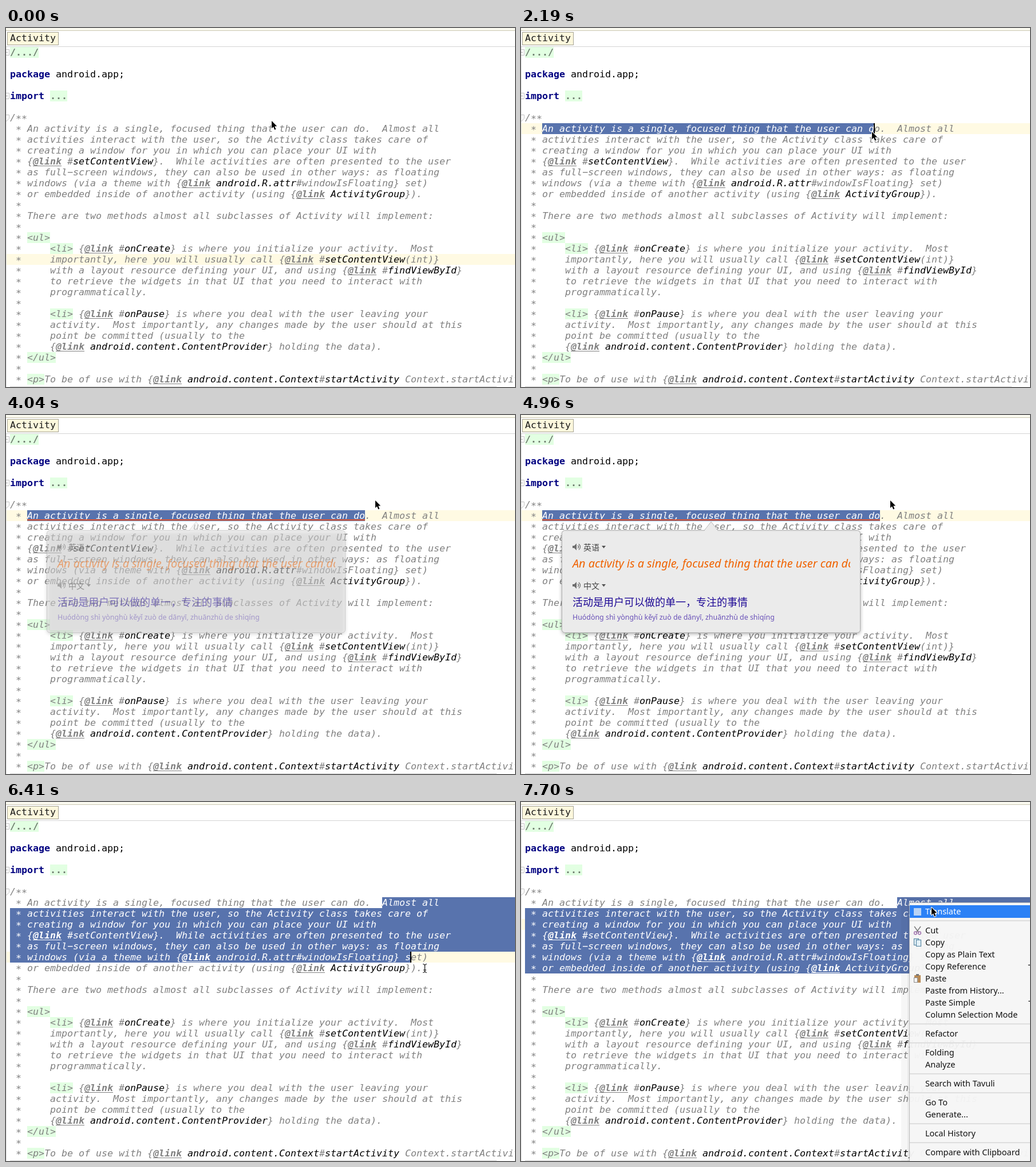
An HTML page with a canvas for the animation above (8 s loop, 889 by 626 pixels).

```html
<!DOCTYPE html>
<html lang="en">
<head>
<meta charset="utf-8">
<title>Translate selection</title>
<style>
html, body { margin: 0; width: 889px; height: 626px; overflow: hidden; background: #fff; }
canvas { display: block; }
</style>
</head>
<body>
<canvas id="stage" width="889" height="626"></canvas>
<script>
const ctx = document.getElementById('stage').getContext('2d');
const W = 889, H = 626, LOOP = 8000;
const LEFT = 7, TOP = 33, COL = 10, ROW = 19;
const MONO = '16.61px "DejaVu Sans Mono", monospace';
const UI = '"Noto Sans", "Open Sans", sans-serif';
const CJK = '"Noto Sans CJK SC", "Noto Sans CJK", sans-serif';
const CREAM = '#fffae3', GREEN = '#e2ffe2', BLUE = '#5873ad';

// Backticks mark link targets.
const DOC = `An activity is a single, focused thing that the user can do.  Almost all
activities interact with the user, so the Activity class takes care of
creating a window for you in which you can place your UI with
{@link #\`setContentView\`}.  While activities are often presented to the user
as full−screen windows, they can also be used in other ways: as floating
windows (via a theme with {@link \`android.R.attr\`#windowIsFloating} set)
or embedded inside of another activity (using {@link \`ActivityGroup\`}).

There are two methods almost all subclasses of Activity will implement:

<ul>
    <li> {@link #\`onCreate\`} is where you initialize your activity.  Most
    importantly, here you will usually call {@link #\`setContentView\`(int)}
    with a layout resource defining your UI, and using {@link #\`findViewById\`}
    to retrieve the widgets in that UI that you need to interact with
    programmatically.

    <li> {@link #\`onPause\`} is where you deal with the user leaving your
    activity.  Most importantly, any changes made by the user should at this
    point be committed (usually to the
    {@link \`android.content.ContentProvider\`} holding the data).
</ul>

<p>To be of use with {@link \`android.content.Context\`#\`startActivity\` Context.startActivity(Intent)`
  .split('\n').map(line => line.split(/(`[^`]*`|@link|<\/?\w+>)/));
const FIRST = 7;

const MENU = [
  ['Translate', '^⌘U', 'translate'], null,
  ['Cut', '⌘X', 'cut'], ['Copy', '⌘C', 'copy'], ['Copy as Plain Text'], ['Copy Reference', '⌥⇧⌘C'],
  ['Paste', '⌘V', 'paste'], ['Paste from History...', '⇧⌘V'], ['Paste Simple', '⌥⇧⌘V'],
  ['Column Selection Mode', '⇧⌘8'], null,
  ['Find Usages', '⇧⌘G'], ['Find Sample Code', '⌥F8'], ['Refactor', '▶'], null,
  ['Folding', '▶'], ['Analyze', '▶'], null,
  ['Search with Tavuli'], null,
  ['Go To', '▶'], ['Generate...', '⌘N'], null,
  ['Local History', '▶'], null,
  ['Compare with Clipboard']
];
const SHORT_MENU = MENU.filter(item => !item || !item[0].startsWith('Find'));

// Current line, selection start/end columns (start is always on the first doc row).
const EDITS = [
  { t: 0, row: 19 },
  { t: 880, row: 7, end: 3, caret: true },
  { t: 1580, row: 7, start: 3, end: 29, caret: true },
  { t: 1780, row: 7, start: 3, end: 42, caret: true },
  { t: 2020, row: 7, start: 3, end: 56, caret: true },
  { t: 2190, row: 7, start: 3, end: 61, caret: true },
  { t: 2600, row: 7, start: 3, end: 62, caret: true },
  { t: 4020, row: 7, start: 3, end: 62 },
  { t: 5160, row: 6, end: 3, caret: true },
  { t: 5790, row: 7, end: 65, caret: true },
  { t: 6030, row: 10, start: 65, end: 66, caret: true },
  { t: 6200, row: 11, start: 65, end: 68, caret: true },
  { t: 6410, row: 12, start: 65, end: 70, caret: true },
  { t: 6590, row: 13, start: 65, end: 72, caret: true },
  { t: 7360, row: 13, start: 65, end: 72, gutter: 9 }
];

const pose = (t, x, y, beam) => ({ t, x, y, beam });
const sweep = Array.from({ length: 8 }, (_, i) => {
  const p = (i + 1) / 8, k = p * p * (3 - 2 * p);
  return pose(230 + 650 * i / 7, 443 - 415 * k, 161 + 7 * k);
});
const POINTER = [
  pose(0, 463, 161), pose(90, 443, 161), ...sweep,
  pose(1050, 31, 169), pose(1170, 35, 170), pose(1400, 233, 176), pose(1580, 457, 177),
  pose(1780, 560, 180), pose(2020, 612, 180), pose(2400, 622, 179),
  pose(2810, 618, 178), pose(2930, 614, 177),
  pose(3380, 628, 164), pose(3500, 640, 152), pose(3620, 644, 148),
  pose(5160, 650, 158, true), pose(5280, 656, 168, true), pose(5430, 656, 173, true),
  pose(5520, 656, 178, true), pose(5880, 660, 226, true), pose(6030, 684, 264, true),
  pose(6200, 710, 274, true), pose(6410, 731, 290, true),
  pose(6800, 712, 284), pose(6902, 677, 274), pose(7210, 688, 255),
  pose(7360, 698, 236), pose(7470, 706, 221), pose(7620, 712, 200), pose(7700, 716, 183)
];

const at = (list, t) => list.reduce((found, item) => item.t <= t ? item : found);
const rowTop = row => TOP + row * ROW;
const colX = col => LEFT + col * COL;

function rect(x, y, w, h, color) {
  ctx.fillStyle = color;
  ctx.fillRect(x, y, w, h);
}

function text(str, x, y, font, color, align = 'left') {
  ctx.font = font;
  ctx.fillStyle = color;
  ctx.textAlign = align;
  ctx.fillText(str, x, y);
}

function poly(points, fill, stroke, width = 1) {
  ctx.beginPath();
  points.forEach(([x, y]) => ctx.lineTo(x, y));
  ctx.closePath();
  if (stroke) { ctx.strokeStyle = stroke; ctx.lineWidth = width; ctx.stroke(); }
  if (fill) { ctx.fillStyle = fill; ctx.fill(); }
}

function line(points, color, width = 1) {
  ctx.beginPath();
  points.forEach(([x, y]) => ctx.lineTo(x, y));
  ctx.strokeStyle = color;
  ctx.lineWidth = width;
  ctx.stroke();
}

function docLine(tokens, row, selected) {
  const base = rowTop(row) + 15;
  const gray = selected ? '#fff' : '#808080';
  text('*', colX(1), base + 2, 'italic ' + MONO, gray);
  let col = 3;
  for (const token of tokens) {
    const target = token[0] === '`', link = token === '@link';
    const str = target ? token.slice(1, -1) : token;
    const x = colX(col), width = str.length * COL;
    if (token[0] === '<' && !selected) rect(x, rowTop(row), width, ROW, GREEN);
    text(str, x, base, (link ? 'bold italic ' : 'italic ') + MONO, target && !selected ? '#000' : gray);
    if (link) rect(x, base + 2, width, 1, gray);
    col += str.length;
  }
}

function header() {
  rect(0, 0, W, 4, '#fbfaf0');
  rect(0, 4, W, 1, '#cbc7b2');
  rect(0, 32, W, 1, '#d4d4d4');
  rect(2, 7, 90, 23, '#a5a394');
  rect(3, 8, 88, 21, '#fdf8dd');
  text('Activity', 7, 23, MONO, '#1a1a1a');
}

function codeTop() {
  for (const [row, x, w] of [[0, 7, 50], [4, 77, 30]]) {
    rect(x, rowTop(row), w, ROW, GREEN);
    line([[0, rowTop(row) + 4.5], [5.5, rowTop(row) + 4.5], [5.5, rowTop(row) + 14.5], [0, rowTop(row) + 14.5]], '#c4c4c4');
    line([[0, rowTop(row) + 9.5], [3, rowTop(row) + 9.5]], '#b0b0b0');
  }
  line([[0, 151.5], [5.5, 151.5], [5.5, 158], [0, 163]], '#c4c4c4');
  text('/.../', LEFT, rowTop(0) + 15, 'bold ' + MONO, '#6c7a6c');
  text('package', LEFT, rowTop(2) + 15, 'bold ' + MONO, '#000080');
  text('android.app;', colX(8), rowTop(2) + 15, MONO, '#000');
  text('import', LEFT, rowTop(4) + 15, 'bold ' + MONO, '#000080');
  text('...', colX(7), rowTop(4) + 15, 'bold ' + MONO, '#6c7a6c');
  text('/', LEFT, rowTop(6) + 15, 'italic ' + MONO, '#808080');
  text('**', colX(1), rowTop(6) + 17, 'italic ' + MONO, '#808080');
}

function selection({ row, start, end }) {
  ctx.save();
  ctx.beginPath();
  for (let r = FIRST; r <= row; r++) {
    const x = r === FIRST ? colX(start) : LEFT;
    const right = r === row ? colX(end) : W;
    ctx.rect(x, rowTop(r), right - x, ROW);
  }
  ctx.clip();
  rect(0, 0, W, H, BLUE);
  for (let r = FIRST; r <= row; r++) docLine(DOC[r - FIRST], r, true);
  ctx.restore();
}

function editor(state) {
  rect(0, 0, W, H, '#fff');
  rect(0, rowTop(state.gutter || state.row), W, ROW, CREAM);
  rect(0, 33, 1, H, '#e2e2e2');
  header();
  codeTop();
  DOC.forEach((tokens, i) => docLine(tokens, FIRST + i, false));
  if (state.start) selection(state);
  if (state.caret) rect(colX(state.end) - 1, rowTop(state.row), 2, ROW, '#000');
  rect(7, 625, 850, 1, '#cfcfcf');
}

function icon(kind, x, y) {
  if (kind === 'translate') rect(x, y - 6, 13, 13, '#b9d3f5');
  if (kind === 'cut') {
    line([[x + 1, y - 7], [x + 9, y + 4]], '#777', 1.4);
    line([[x + 12, y - 7], [x + 4, y + 4]], '#777', 1.4);
    for (const dx of [3, 10]) {
      ctx.beginPath();
      ctx.arc(x + dx, y + 4.5, 2.4, 0, 7);
      ctx.strokeStyle = '#a274b0';
      ctx.lineWidth = 1.5;
      ctx.stroke();
    }
  }
  if (kind === 'copy') {
    for (const [dx, dy] of [[0.5, -6.5], [4.5, -4.5]]) {
      rect(x + dx, y + dy, 8, 11, '#e4f1f8');
      ctx.strokeStyle = '#5d8aa6';
      ctx.lineWidth = 1.2;
      ctx.strokeRect(x + dx, y + dy, 8, 11);
    }
  }
  if (kind === 'paste') {
    rect(x + 1, y - 6, 11, 13, '#b98a55');
    rect(x + 4, y - 8, 5, 3, '#777');
    rect(x, y - 2, 7, 9, '#8c8c8c');
    rect(x + 1, y - 1, 5, 7, '#f3f3f3');
  }
}

function menu(items, x, top, mouse) {
  rect(x - 15, top - 10, W, H, 'rgba(0,0,0,.035)');
  rect(x - 4, top + 2, 4, H, 'rgba(0,0,0,.05)');
  rect(x - 1, top, W, H, 'rgba(185,185,185,.9)');
  rect(x, top + 1, W, H, '#f6f6f6');
  // Faint trace of the page through the panel.
  ctx.save();
  ctx.beginPath();
  ctx.rect(x, top + 1, W, H);
  ctx.clip();
  ctx.globalAlpha = 0.04;
  DOC.forEach((tokens, i) => docLine(tokens, FIRST + i, false));
  ctx.restore();

  let y = top + 16;
  for (const item of items) {
    if (!item) {
      rect(x, y - 6, W, 2, '#dedede');
      y += 12;
      continue;
    }
    const [label, key, kind] = item;
    const hover = mouse.x > x && Math.abs(mouse.y - y) <= 10.5;
    const color = hover ? '#fff' : '#111';
    if (hover) rect(x, y - 11, W, 22, '#2c81f6');
    text(label, x + 27, y + 5, '14.5px ' + UI, color);
    if (key === '▶') poly([[x + 256, y - 5], [x + 265, y], [x + 256, y + 5]], '#333');
    else if (key) text(key, x + 258, y + 5, '14.5px "Noto Sans", "DejaVu Sans", sans-serif', color, 'right');
    if (kind) icon(kind, x + 7, y);
    y += 21;
  }
}

function language(name, y) {
  poly([[90, y - 2], [93, y - 2], [97, y - 6], [97, y + 6], [93, y + 2], [90, y + 2]], '#6e6e6e');
  for (const r of [3, 6]) {
    ctx.beginPath();
    ctx.arc(97.5, y, r, -1, 1);
    ctx.strokeStyle = '#6e6e6e';
    ctx.lineWidth = 1.3;
    ctx.stroke();
  }
  text(name, 109, y + 6, '14px ' + CJK, '#444');
  poly([[141, y - 2], [148, y - 2], [144.5, y + 2.5]], '#555');
}

function balloon(alpha) {
  rect(37, 182, 590, 2, '#e2552c');
  ctx.save();
  ctx.globalAlpha = alpha;
  ctx.beginPath();
  ctx.roundRect(71.5, 201.5, 521, 178, 5);
  ctx.save();
  ctx.shadowColor = 'rgba(0,0,0,.35)';
  ctx.shadowBlur = 6;
  ctx.shadowOffsetY = 2;
  ctx.fillStyle = '#ebebeb';
  ctx.fill();
  ctx.restore();
  ctx.strokeStyle = '#b0b0b0';
  ctx.lineWidth = 1;
  ctx.stroke();
  poly([[320, 202.5], [332, 186], [344, 202.5]], '#ebebeb');
  line([[320, 201.5], [332, 186], [344, 201.5]], '#b8b8b8');

  language('英语', 230);
  language('中文', 297);
  text('活动是用户可以做的单一，专注的事情', 90, 333, '18px ' + CJK, '#1f0a96');
  text('Huódòng shì yònghù kěyǐ zuò de dānyī, zhuānzhù de shìqíng', 90, 357, '12.4px ' + UI, '#6a52b8');
  ctx.beginPath();
  ctx.rect(85, 240, 490, 40);
  ctx.clip();
  text('An activity is a single, focused thing that the user can do', 90, 266, 'italic 19.8px ' + UI, '#f06200');
  ctx.restore();
}

function pointer({ x, y, beam }) {
  ctx.save();
  ctx.translate(Math.round(x), Math.round(y));
  ctx.lineJoin = 'round';
  if (beam) {
    for (const [color, width] of [['rgba(255,255,255,.8)', 3], ['#222', 1.2]]) {
      line([[-3, -7.5], [-1, -7], [0.5, -5.5], [0.5, 5.5], [-1, 7], [-3, 7.5]], color, width);
      line([[4, -7.5], [2, -7], [0.5, -5.5], [0.5, 5.5], [2, 7], [4, 7.5]], color, width);
      line([[-2, 3], [3, 3]], color, width);
    }
  } else {
    poly([[1, 1], [1, 14], [4, 11.3], [6.2, 16.5], [8.4, 15.6], [6.2, 10.5], [10.2, 10.3]], '#000', '#fff', 2);
  }
  ctx.restore();
}

function draw(t) {
  const mouse = at(POINTER, t);
  editor(at(EDITS, t));
  if (t >= 3260 && t < 3920) menu(MENU, 617, 133, mouse);
  if (t >= 7005) menu(SHORT_MENU, 679, 175, mouse);
  if (t >= 4020 && t < 5280) balloon(t < 4120 || t >= 5160 ? 0.5 : 1);
  pointer(mouse);
}

const began = performance.now();
function tick() {
  draw((performance.now() - began) % LOOP);
  requestAnimationFrame(tick);
}
tick();
</script>
</body>
</html>
```
